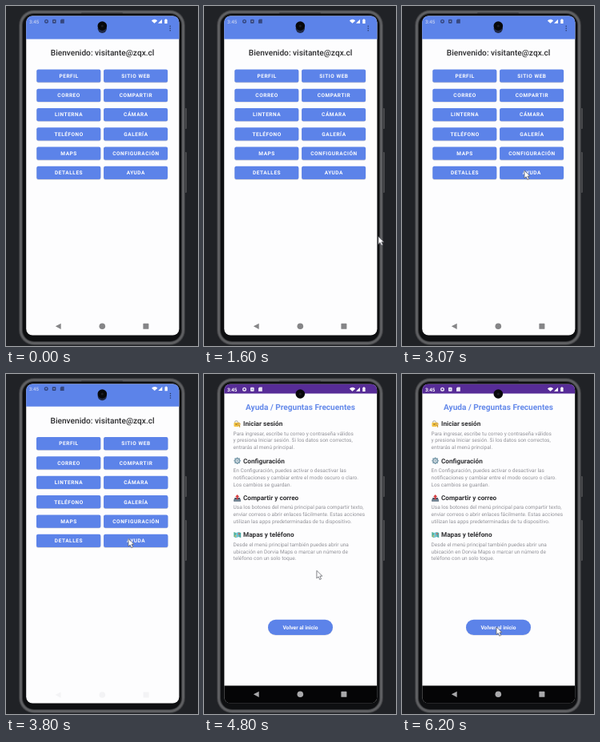
An HTML page with a canvas that plays this animation: 240 px wide and 426 px high, repeating every 8000 ms.

```html
<!DOCTYPE html>
<html lang="es">
<head>
<meta charset="utf-8">
<title>Menú y ayuda</title>
<style>
html, body { margin: 0; width: 100%; height: 100%; overflow: hidden; background: #202226; }
canvas { display: block; width: 240px; height: 426px; }
</style>
</head>
<body>
<canvas id="stage"></canvas>
<script>
const W = 240, H = 426, LOOP = 8000;
const BLUE = '#5c83e9', WHITE = '#fdfdfe';
const SCREEN = { x: 25.2, y: 12.5, w: 191.2, h: 400 };
const canvas = document.getElementById('stage');
const ctx = canvas.getContext('2d');
const ratio = window.devicePixelRatio || 1;
canvas.width = W * ratio;
canvas.height = H * ratio;

const BUTTONS = [
  ['PERFIL', 'SITIO WEB'], ['CORREO', 'COMPARTIR'], ['LINTERNA', 'CÁMARA'],
  ['TELÉFONO', 'GALERÍA'], ['MAPS', 'CONFIGURACIÓN'], ['DETALLES', 'AYUDA']
];

const SECTIONS = [
  { icon: lockIcon, title: 'Iniciar sesión', lines: [
    'Para ingresar, escribe tu correo y contraseña válidos',
    'y presiona Iniciar sesión. Si los datos son correctos,',
    'entrarás al menú principal.'] },
  { icon: gearIcon, title: 'Configuración', lines: [
    'En Configuración, puedes activar o desactivar las',
    'notificaciones y cambiar entre el modo oscuro o claro.',
    'Los cambios se guardan.'] },
  { icon: trayIcon, title: 'Compartir y correo', lines: [
    'Usa los botones del menú principal para compartir texto,',
    'enviar correos o abrir enlaces fácilmente. Estas acciones',
    'utilizan las apps predeterminadas de tu dispositivo.'] },
  { icon: mapIcon, title: 'Mapas y teléfono', lines: [
    'Desde el menú principal también puedes abrir una',
    'ubicación en Dorvia Maps o marcar un número de',
    'teléfono con un solo toque.'] }
];

// Pointer path: time, x, y
const PATH = [
  [1390, 241, 341], [1600, 218, 289], [1730, 207, 270], [2200, 153, 206],
  [3900, 153, 206.5], [4500, 153, 207], [4800, 141, 246], [5200, 118, 317]
];

const clamp = v => Math.max(0, Math.min(1, v));
const progress = (t, from, to) => clamp((t - from) / (to - from));
const easeOut = p => 1 - (1 - p) ** 2;

function rect(x, y, w, h, color, r = 0) {
  ctx.fillStyle = color;
  ctx.beginPath();
  ctx.roundRect(x, y, w, h, r);
  ctx.fill();
}

function disc(x, y, r, color) {
  ctx.fillStyle = color;
  ctx.beginPath();
  ctx.arc(x, y, r, 0, 7);
  ctx.fill();
}

function poly(points, color) {
  ctx.fillStyle = color;
  ctx.beginPath();
  points.forEach(([x, y]) => ctx.lineTo(x, y));
  ctx.closePath();
  ctx.fill();
}

function ring(x, y, r, color, width, start = 0, end = 7) {
  ctx.strokeStyle = color;
  ctx.lineWidth = width;
  ctx.beginPath();
  ctx.arc(x, y, r, start, end);
  ctx.stroke();
}

function text(str, x, y, size, color, { weight = 400, align = 'left', spacing = 0 } = {}) {
  ctx.font = `${weight} ${size}px Roboto, sans-serif`;
  ctx.letterSpacing = spacing + 'px';
  ctx.textRendering = 'geometricPrecision';
  ctx.textAlign = align;
  ctx.fillStyle = color;
  ctx.fillText(str, x, y);
}

function lockIcon(x, y) {
  ring(x + 3.4, y - 1.6, 2, '#a3a49f', 1, Math.PI, 0);
  rect(x + 0.4, y - 1.6, 6.2, 5.4, '#f3c444', 1);
  ring(x + 6.6, y + 0.4, 1.4, '#cf9a2c', 1.1);
  rect(x + 6.9, y + 1.6, 1.2, 2.8, '#cf9a2c');
  disc(x + 3.2, y + 0.8, 0.8, '#7a5a20');
}

function gearIcon(x, y) {
  for (let i = 0; i < 8; i++) {
    const a = i * Math.PI / 4;
    disc(x + 4.6 + 3.5 * Math.cos(a), y + 3.5 * Math.sin(a), 0.9, '#7d9dad');
  }
  ring(x + 4.6, y, 2.7, '#7d9dad', 1.5);
  disc(x + 4.6, y, 1.1, '#7d9dad');
}

function trayIcon(x, y) {
  poly([[x + 1.4, y], [x + 7.8, y], [x + 9.2, y + 4.3], [x, y + 4.3]], '#49586a');
  rect(x + 0.2, y + 1.8, 8.8, 2.5, '#6f8190', 0.5);
  rect(x + 3.6, y - 1.6, 2, 3.6, '#d53b3f');
  poly([[x + 4.6, y - 4.2], [x + 7.2, y - 1.2], [x + 2, y - 1.2]], '#d53b3f');
}

function mapIcon(x, y) {
  // Three folded panels
  ['#58b5a0', '#6cc3d3', '#4fa8a4'].forEach((color, i) => {
    const left = x + 0.2 + i * 3, tilt = i % 2 ? 1 : -1;
    poly([[left, y - 3 + tilt * 0.6], [left + 3, y - 3 - tilt * 0.6],
          [left + 3, y + 3.2 - tilt * 0.6], [left, y + 3.2 + tilt * 0.6]], color);
  });
  disc(x + 2.4, y + 1.4, 1, '#d7bf68');
  disc(x + 6.6, y - 1.2, 1, '#d9605a');
}

function statusBar(ink, symbols) {
  text('3:45', 29, 21.6, 6.2, ink, { weight: 700 });
  ring(50.5, 19.2, 1.8, symbols, 1.4);
  rect(58, 16.7, 4.6, 5, symbols, 1);
  rect(59.5, 18.4, 1.6, 1.6, '#8999cf');
  poly([[69.3, 16.5], [72.8, 16.5], [72.8, 21.8], [68, 21.8], [68, 17.8]], symbols);
  ctx.fillStyle = WHITE;
  ctx.beginPath();
  ctx.moveTo(185.5, 21.8);
  ctx.arc(185.5, 21.8, 5, -Math.PI * 0.76, -Math.PI * 0.24);
  ctx.fill();
  poly([[190, 21.8], [195, 16.8], [195, 21.8]], WHITE);
  rect(198.2, 17, 3.4, 5, WHITE, 0.5);
  rect(199.2, 16.3, 1.4, 1, WHITE);
}

function navBar(color) {
  poly([[61.8, 401.3], [68.7, 397.7], [68.7, 404.9]], color);
  disc(120.3, 401.3, 3.8, color);
  rect(171.4, 397.8, 7, 7, color, 0.6);
}

function homeScreen(navAlpha) {
  const { x, y, w, h } = SCREEN;
  rect(x - 15, y - 15, w + 30, h + 30, WHITE);
  rect(x - 15, y - 15, w + 30, 44, BLUE);
  statusBar('#b6c4ef', '#35477f');
  disc(120.3, 28.3, 5.6, '#202a49');
  for (const dy of [25.2, 28, 30.8]) disc(205.2, dy, 0.75, '#27345e');
  text('Bienvenido: visitante@zqx.cl', 120.6, 62.2, 10.15, '#2c2c2e', { weight: 500, align: 'center' });
  BUTTONS.forEach((row, i) => row.forEach((label, j) => {
    const left = 38.3 + j * 83.8, top = 79.4 + i * 24.28;
    rect(left, top + 0.7, 80, 16.2, 'rgba(60,70,110,.3)', 2);
    rect(left, top, 80, 16.2, BLUE, 2);
    text(label, left + 40.3, top + 10.5, 6.5, WHITE, { weight: 700, align: 'center', spacing: 0.55 });
  }));
  ctx.save();
  ctx.globalAlpha *= navAlpha;
  navBar('#858587');
  ctx.restore();
}

function helpScreen() {
  const { x, y, w, h } = SCREEN;
  rect(x, y, w, h, WHITE);
  rect(x, y, w, 12, '#572c97');
  statusBar(WHITE, '#ece6f5');
  text('Ayuda / Preguntas Frecuentes', 120.5, 45.3, 10.1, '#658aea', { weight: 700, align: 'center' });
  SECTIONS.forEach(({ icon, title, lines }, i) => {
    const mid = 62.3 + i * 46.4;
    icon(37, mid);
    text(title, 49, mid + 2.8, 8.2, '#303033', { weight: 700 });
    lines.forEach((line, k) => text(line, 36.6, mid + 14.2 + k * 8.85, 6.5, '#929298'));
  });
  rect(80, 308.4, 81, 19.2, 'rgba(60,70,110,.22)', 9.6);
  rect(80, 307.8, 81, 19.2, BLUE, 9.6);
  text('Volver al inicio', 120.5, 319.8, 6.7, WHITE, { weight: 700, align: 'center' });
  rect(x, 390.6, w, 23, '#050506');
  navBar('#a9a9ab');
}

function phoneBody() {
  rect(0, 0, W, H, '#202226');
  rect(222, 128, 4, 26, '#47484b', 1);
  rect(222, 183, 4, 51, '#47484b', 1);
  const layers = ['#3b3c3f', '#58595c', '#636467', '#58595b', '#333437', '#0e0f11'];
  layers.forEach((color, i) => {
    rect(16 + i, 5 + i, 208 - 2 * i, 420 - 2 * i, color, 19 - i);
  });
  rect(94, 8.6, 52, 1.4, '#2b2c2f', 0.7);
}

function scaled(scale, alpha, draw) {
  const cx = SCREEN.x + SCREEN.w / 2, cy = SCREEN.y + SCREEN.h / 2;
  ctx.save();
  ctx.globalAlpha = alpha;
  ctx.translate(cx, cy);
  ctx.scale(scale, scale);
  ctx.translate(-cx, -cy);
  draw();
  ctx.restore();
}

function pointer(t) {
  if (t < PATH[0][0]) return;
  const next = PATH.findIndex(key => key[0] > t);
  const b = next < 0 ? PATH[PATH.length - 1] : PATH[next];
  const a = next < 0 ? b : PATH[next - 1];
  const settles = b[0] === 2200 || b[0] === 5200;
  const raw = a === b ? 1 : progress(t, a[0], b[0]);
  const p = settles ? easeOut(raw) : raw;
  ctx.save();
  ctx.translate(a[1] + (b[1] - a[1]) * p, a[2] + (b[2] - a[2]) * p);
  poly([[0, 0], [0, 9.6], [2.2, 7.6], [3.8, 11.2], [5.6, 10.4], [4, 6.9], [7, 6.8]], WHITE);
  ctx.strokeStyle = '#5c5e64';
  ctx.lineWidth = 0.75;
  ctx.lineJoin = 'round';
  ctx.stroke();
  ctx.restore();
}

function draw(t) {
  ctx.setTransform(ratio, 0, 0, ratio, 0, 0);
  phoneBody();
  ctx.save();
  ctx.beginPath();
  ctx.roundRect(SCREEN.x, SCREEN.y, SCREEN.w, SCREEN.h, 8);
  ctx.clip();
  const opened = progress(t, 3840, 3910);
  if (opened < 1) {
    const zoom = 1 + 0.04 * progress(t, 3730, 3960) ** 2;
    scaled(zoom, 1, () => homeScreen(1 - 0.92 * progress(t, 3730, 3800)));
  }
  if (opened > 0) {
    scaled(0.95 + 0.05 * easeOut(progress(t, 3840, 3990)), opened, helpScreen);
  }
  ctx.restore();
  disc(120.3, 25, 5.8, '#08080a');
  disc(120.3, 25, 1.6, '#1d1e24');
  pointer(t);
}

const start = performance.now();
function frame() {
  draw((performance.now() - start) % LOOP);
  requestAnimationFrame(frame);
}
frame();
</script>
</body>
</html>
```
